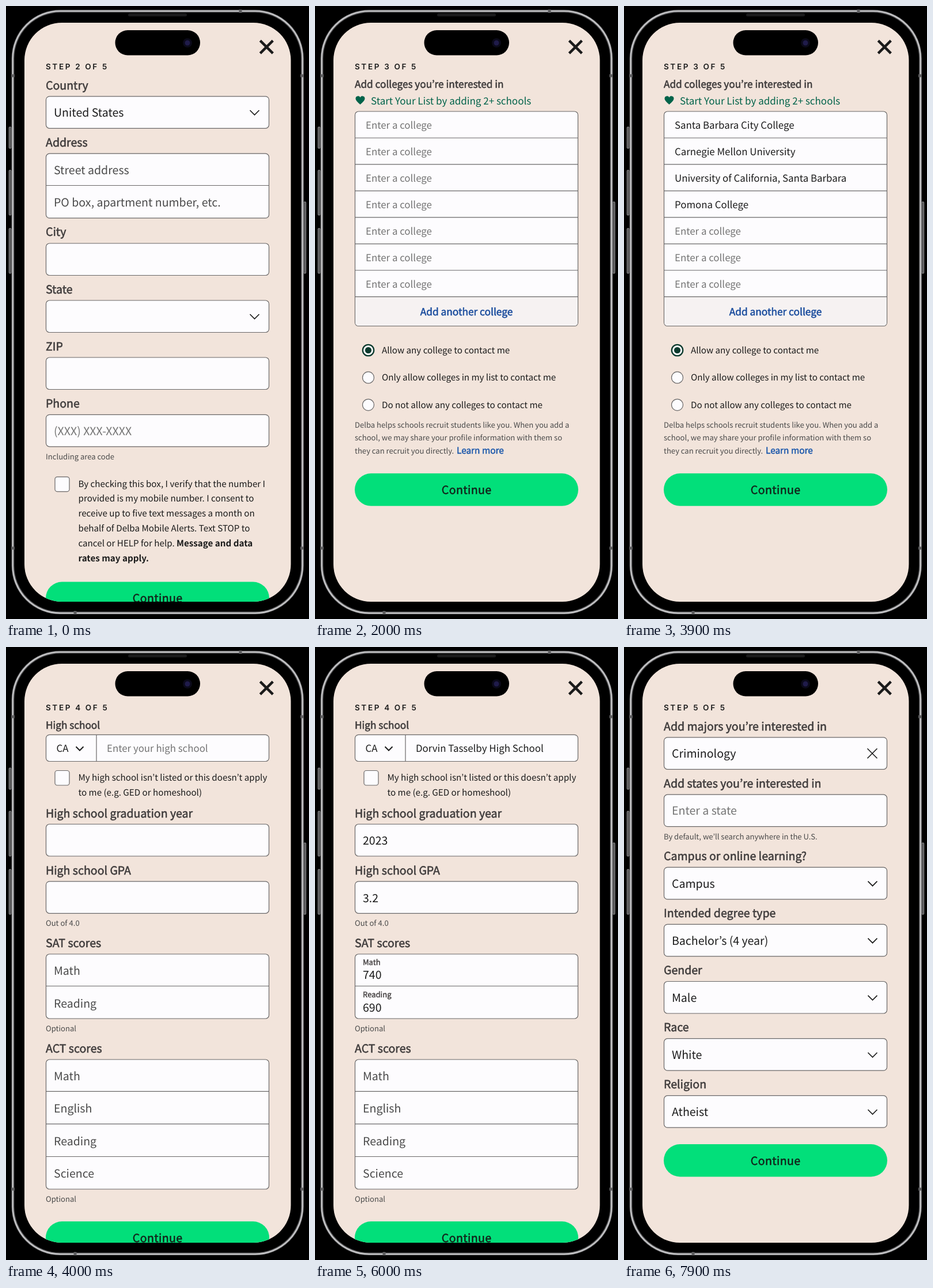
Animation of 526x1064 px, one loop 8 s. Source, as an HTML page:

```html
<!DOCTYPE html>
<html lang="en">
<head>
<meta charset="utf-8">
<title>Sign-up form</title>
<style>
  html, body { margin: 0; height: 100%; overflow: hidden; background: #000; }
  svg { display: block; width: 100vw; height: 100vh; }
  text {
    font-family: "Noto Sans CJK KR", "Noto Sans CJK JP", "Noto Sans CJK SC", "Open Sans", sans-serif;
    text-rendering: geometricPrecision;
  }
  .step { font: 600 13.5px Inter, sans-serif; letter-spacing: 2.65px; }
</style>
</head>
<body>
<svg id="stage" viewBox="0 0 526 1064"></svg>
<script>
const LOOP = 8000;
const INK = '#1b1b1b', LABEL = '#403d3d', SOFT = '#4a4a4a', HINT = '#747474';
const LINE = '#696767', PAPER = '#fdfcfe', BLUE = '#174a9c', GREEN = '#00634a', PINE = '#0c3b2e';
const BIG = 19.55, MID = 16.85, BODY = 15.18, SMALL = 13.05;

// y is the middle of the capitals; heavy adds weight through a thin outline
function text(x, y, str, size = BIG, color = INK, heavy = 0, extra = '') {
  const outline = heavy ? `stroke="${color}" stroke-width="${heavy}"` : '';
  return `<text x="${x}" y="${y + 0.366 * size}" font-size="${size}" fill="${color}" ${outline} ${extra}>${str}</text>`;
}
const label = (y, str, size = BIG) => text(69, y, str, size, LABEL, 0.6);
const note = (y, str) => text(69, y, str, SMALL, SOFT);
const path = (d, width = 1.7, color = INK) =>
  `<path d="${d}" fill="none" stroke="${color}" stroke-width="${width}"/>`;
const rect = (x, y, w, h, r, fill, extra = '') =>
  `<rect x="${x}" y="${y}" width="${w}" height="${h}" rx="${r}" fill="${fill}" ${extra}/>`;
const circle = (x, y, r, fill, extra = '') =>
  `<circle cx="${x}" cy="${y}" r="${r}" fill="${fill}" ${extra}/>`;
const outlined = `stroke="${LINE}" stroke-width="1.2"`;

const box = (y, h = 55.5) => rect(69.5, y, 387, h, 6, PAPER, outlined);
const rule = y => path(`M69.5 ${y}H456.5`, 1.2, LINE);
const check = y => rect(85, y, 25, 25.5, 4, PAPER, outlined);
const chevron = y => path(`M423.5 ${y - 4}l8 8l8 -8`);
const cross = (x, y, r, width) =>
  path(`M${x - r} ${y - r}l${2 * r} ${2 * r}M${x + r} ${y - r}l${-2 * r} ${2 * r}`, width);
const button = y => rect(69, y, 388, 56.5, 28.2, '#02df7a') +
  text(263.2, y + 28.5, 'Continue', BIG, '#13241b', 0.55, 'text-anchor="middle" letter-spacing=".4"');

// Visible from one time until another
const show = (from, to, body) => `<g data-from="${from}" data-to="${to}">${body}</g>`;
const swap = (at, before, after) => show(0, at, before) + show(at, LOOP, after);
const hinted = (at, x, y, hint, value, size = BIG) =>
  swap(at, hint && text(x, y, hint, size, HINT), text(x, y, value, size));
const floating = (at, top, name, value) => swap(at,
  text(83, top + 28.7, name, BIG, SOFT),
  text(83, top + 14, name, SMALL, LABEL, 0.4) + text(83, top + 36.3, value));
const page = (from, to, n, body) =>
  show(from, to, `<text class="step" x="69" y="110" fill="${INK}">STEP ${n} OF 5</text>` + body);

function addressPage() {
  const lines = [
    'By checking this box, I verify that the number I',
    'provided is my mobile number. I consent to',
    'receive up to five text messages a month on',
    'behalf of Delba Mobile Alerts. Text STOP to',
    'cancel or HELP for help. <tspan font-weight="700">Message and data</tspan>',
    '<tspan font-weight="700">rates may apply.</tspan>'
  ];
  return label(138, 'Country') + box(156.8) + text(83, 185, 'United States') + chevron(185) +
    label(236.5, 'Address') + box(256.2, 112) + rule(311.5) +
    floating(1000, 256, 'Street address', '27 Sample Road') +
    text(83, 341, 'PO box, apartment number, etc.', BIG, SOFT) +
    label(392, 'City') + box(412) + hinted(1200, 83, 440, '', 'Santa Barbara') +
    label(491.5, 'State') + box(511) + hinted(1400, 83, 539, '', 'California') + chevron(539) +
    label(590.5, 'ZIP') + box(610) + hinted(1600, 83, 638, '', '93101') +
    label(690, 'Phone') + box(709.3) + hinted(1800, 83, 737.5, '(XXX) XXX-XXXX', '(805) 555-0142') +
    note(782, 'Including area code') + check(817.3) +
    lines.map((s, i) => text(125.5, 829 + i * 25.9, s, BODY)).join('') +
    button(999.5);
}

function collegePage() {
  const picks = ['Santa Barbara City College', 'Carnegie Mellon University',
    'University of California, Santa Barbara', 'Pomona College'];
  const choices = ['Allow any college to contact me',
    'Only allow colleges in my list to contact me', 'Do not allow any colleges to contact me'];
  let out = label(136, 'Add colleges you’re interested in', 17.2) +
    `<path d="M78.5 171C74 167 70.5 164 70.5 160.5A4.2 4.2 0 0 1 78.5 158.8A4.2 4.2 0 0 1 86.5 160.5C86.5 164 83 167 78.5 171Z" fill="${GREEN}"/>` +
    text(97, 164.5, 'Start Your List by adding 2+ schools', 17, GREEN) +
    box(183, 372.5) +
    '<path d="M70 504.7H456V549.5a5.5 5.5 0 0 1 -5.5 5.5H75.5a5.5 5.5 0 0 1 -5.5 -5.5Z" fill="#f6f2f2"/>';
  for (let i = 0; i < 7; i++) {
    const y = 206.5 + i * 46, hint = 'Enter a college';
    out += rule(229 + i * 45.95) +
      (picks[i] ? hinted(3000 + i * 200, 88, y, hint, picks[i], MID) : text(88, y, hint, MID, HINT));
  }
  out += text(263, 531, 'Add another college', 17.3, BLUE, 0.5, 'text-anchor="middle"');
  choices.forEach((s, i) => {
    const y = 597.5 + i * 47.4;
    out += (i ? circle(92.5, y, 10, PAPER, outlined)
      : circle(92.5, y, 9.7, PAPER, `stroke="${PINE}" stroke-width="2.3"`) + circle(92.5, y, 5.6, PINE)) +
      text(116, y, s, BODY);
  });
  return out +
    note(727.5, 'Delba helps schools recruit students like you. When you add a') +
    note(749.7, 'school, we may share your profile information with them so') +
    note(772, 'they can recruit you directly.') +
    text(246, 771.5, 'Learn more', 15.4, '#1a57ab', 0.5) + button(811.3);
}

function schoolPage() {
  const act = ['Math', 'English', 'Reading', 'Science'];
  return label(136, 'High school', 17.2) + box(152.3, 46.2) + path('M157 152.3V198.5', 1.2, LINE) +
    text(87.5, 176, 'CA', MID) + path('M121.5 173l6.5 6.5l6.5 -6.5', 2) +
    hinted(5000, 175, 175.7, 'Enter your high school', 'Dorvin Tasselby High School', MID) +
    check(214.5) +
    text(125.5, 226.5, 'My high school isn’t listed or this doesn’t apply', BODY) +
    text(125.5, 252.5, 'to me (e.g. GED or homeshool)', BODY) +
    label(288.5, 'High school graduation year') + box(307.5) + hinted(5200, 83, 336.3, '', '2023') +
    label(387.7, 'High school GPA') + box(406.8) + hinted(5400, 83, 435.5, '', '3.2') +
    note(479.7, 'Out of 4.0') +
    label(514, 'SAT scores') + box(533, 112) + rule(588.5) +
    floating(5600, 533, 'Math', '740') + floating(5800, 589.7, 'Reading', '690') +
    note(662.5, 'Optional') +
    label(697, 'ACT scores') + box(716, 225) +
    act.map((s, i) => (i ? rule(714.7 + i * 56.6) : '') + text(83, 744.5 + i * 56.5, s, BIG, SOFT)).join('') +
    note(958.7, 'Optional') + button(997);
}

function majorPage() {
  const menu = (y, name, value, at) => label(y - 48, name) + box(y - 28.3) +
    (at ? hinted(at, 83, y, '', value) : text(83, y, value)) + chevron(y);
  return label(138, 'Add majors you’re interested in') + box(156.8) +
    hinted(7000, 83, 185, 'Enter a major', 'Criminology') + show(7000, LOOP, cross(431, 184.7, 8.5, 1.6)) +
    label(236.5, 'Add states you’re interested in') + box(256.2) +
    text(83, 284.3, 'Enter a state', BIG, HINT) +
    note(329, 'By default, we’ll search anywhere in the U.S.') +
    menu(410.7, 'Campus or online learning?', 'Campus', 7200) +
    menu(509.7, 'Intended degree type', 'Bachelor’s (4 year)') +
    menu(608.8, 'Gender', 'Male', 7400) +
    menu(708, 'Race', 'White', 7600) +
    menu(807, 'Religion', 'Atheist', 7800) + button(863);
}

function phone() {
  const edge = (inset, width, color) =>
    rect(10 + inset, 7 + inset, 506.5 - 2 * inset, 1048.5 - 2 * inset, 84 - inset, 'none',
      `stroke="${color}" stroke-width="${width}"`);
  const side = (x, y, h) => rect(x, y, 3.6, h, 1.2, '#4a4a4c', 'stroke="#b4b4b6" stroke-width=".9"');
  return side(5.3, 210, 37) + side(5.3, 285, 78) + side(5.3, 386, 78) + side(517, 340, 124) +
    edge(2, 5, '#4c4c4e') + edge(1.7, 2.6, '#c4c4c6') +
    path('M9 121h6M9 941h6M511 121h6M511 941h6M407 6v6M120 1050v6', 5, '#5c5c5e') +
    rect(212, 13, 102, 5, 2.5, '#1b1b1c');
}

document.getElementById('stage').innerHTML =
  '<clipPath id="screen"><rect x="32" y="29" width="462.5" height="1005" rx="65"/></clipPath>' +
  phone() + '<g clip-path="url(#screen)">' + rect(32, 29, 463, 1005, 0, '#f2e4db') +
  page(0, 2000, 2, addressPage()) + page(2000, 4000, 3, collegePage()) +
  page(4000, 6100, 4, schoolPage()) + page(6100, LOOP, 5, majorPage()) +
  cross(452.3, 71.2, 11, 4.5) + '</g>' +
  rect(189.5, 42, 147.5, 43.5, 21.7, '#000') +
  circle(315, 64, 8, '#0b0a1a') + circle(315, 64, 4.5, '#1f1b4a');

const timed = [...document.querySelectorAll('[data-from]')].map(el =>
  ({ el, from: +el.dataset.from, to: +el.dataset.to }));

const start = performance.now();
function frame(now) {
  const t = Math.max(0, now - start) % LOOP;
  for (const { el, from, to } of timed) el.style.display = t >= from && t < to ? '' : 'none';
  requestAnimationFrame(frame);
}
frame(start);
</script>
</body>
</html>
```
